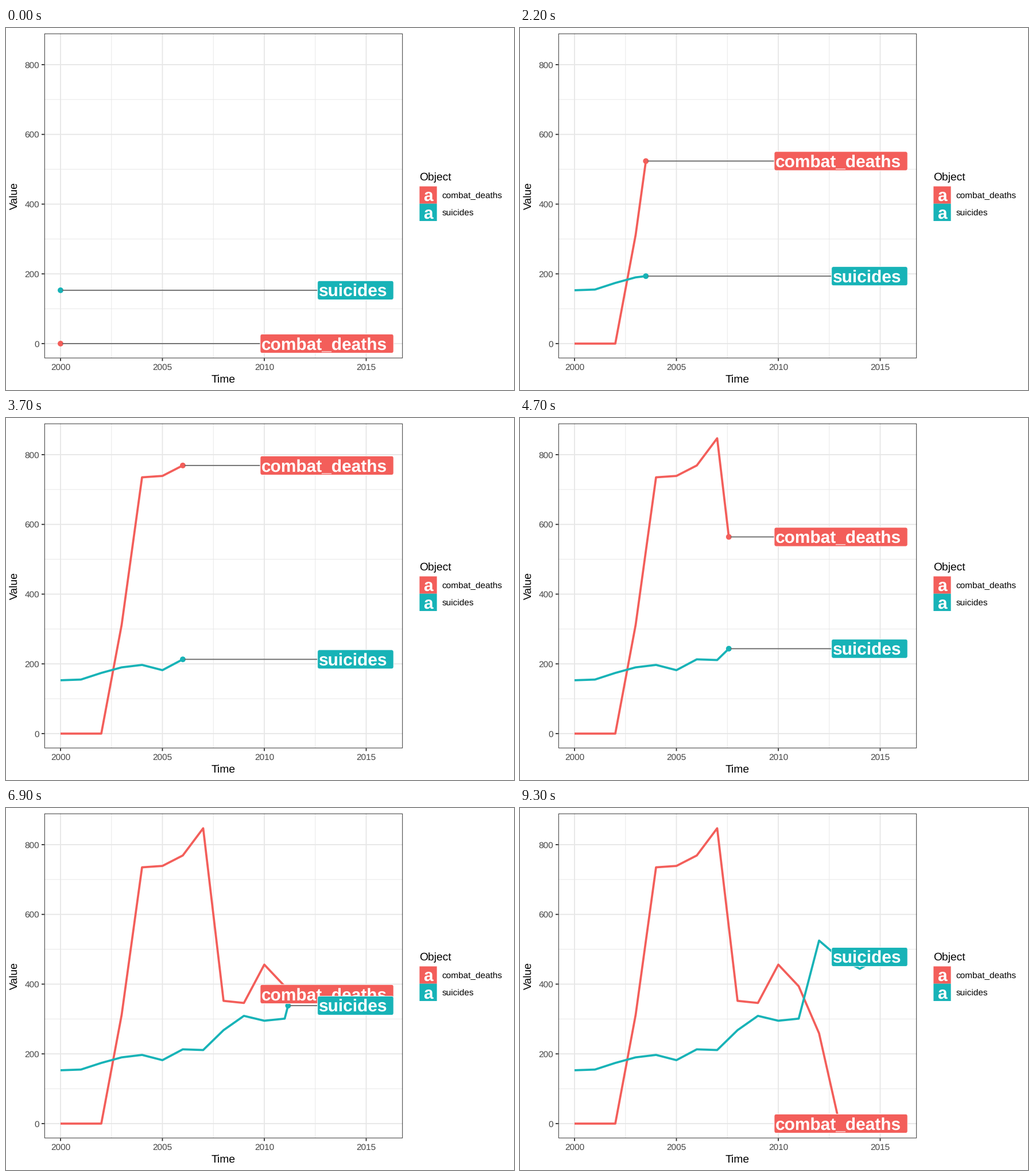
A matplotlib script that plays this animation: 885 px wide and 632 px high, repeating every 9900 ms.

```python
import numpy as np
import matplotlib.pyplot as plt
from matplotlib.animation import FuncAnimation
from matplotlib.patches import Circle, FancyBboxPatch, Rectangle

W, H, DPI = 885, 632, 100
PT = 72 / DPI  # points per pixel
FRAMES, INTERVAL = 99, 100

RED, TEAL = "#F35E5A", "#17B3B7"
GRID, DARK, TICK_TEXT, LEADER = "#E7E7E7", "#333333", "#444444", "#6B6B6B"
LEFT, RIGHT, TOP, BOTTOM = 66.8, 691.2, 9.6, 576.6
LABEL_RIGHT, LABEL_HALF = 675.2, 16.6
SMALL, MEDIUM, LARGE = 15.4, 19.25, 29.87

YEARS = np.arange(17)
KEY_FRAMES = np.round(YEARS * FRAMES / 16)
DEATHS = [0, 0, 0, 312, 735, 739, 769, 847, 352, 346, 456, 394, 259, 0, 0, 0, 0]
SUICIDES = [153, 155, 174, 190, 197, 182, 213, 211, 268, 309, 295, 301, 525,
            475, 444, 478, 478]

plt.rcParams["font.family"] = "Liberation Sans"
plt.rcParams["text.hinting"] = "none"


def px(year):
    return 95 + 35.5 * np.asarray(year)


def py(value):
    return 551 - 0.60875 * np.asarray(value)


fig = plt.figure(figsize=(W / DPI, H / DPI), dpi=DPI, facecolor="white")
ax = fig.add_axes([0, 0, 1, 1])
ax.set_xlim(0, W)
ax.set_ylim(H, 0)
ax.axis("off")


def line(xs, ys, color, width, z):
    return ax.plot(xs, ys, color=color, lw=width * PT, zorder=z, snap=False,
                   solid_capstyle="butt", solid_joinstyle="round")[0]


def text(x, y, s, size, color="black", **kw):
    kw.setdefault("va", "baseline")
    return ax.text(x, y, s, fontsize=size * PT, color=color, **kw)


def draw_panel():
    for year in (2.5, 7.5, 12.5):
        line([px(year)] * 2, [TOP, BOTTOM], GRID, 0.95, 0)
    for value in (100, 300, 500, 700):
        line([LEFT, RIGHT], [py(value)] * 2, GRID, 0.95, 0)
    for year in (0, 5, 10, 15):
        x = px(year)
        line([x, x], [TOP, BOTTOM], GRID, 1.87, 1)
        line([x, x], [BOTTOM, BOTTOM + 4.8], DARK, 1.87, 1)
        text(x, 596.5, str(2000 + year), SMALL, TICK_TEXT, ha="center")
    for value in range(0, 801, 200):
        y = py(value)
        line([LEFT, RIGHT], [y, y], GRID, 1.87, 1)
        line([LEFT - 4.8, LEFT], [y, y], DARK, 1.87, 1)
        text(58.3, y + 5.5, str(value), SMALL, TICK_TEXT, ha="right")
    ax.add_patch(Rectangle((LEFT + 0.5, TOP + 0.5), RIGHT - LEFT - 1,
                           BOTTOM - TOP - 1, fill=False, ec=DARK,
                           lw=PT, zorder=20, snap=False))
    text(379, 619, "Time", MEDIUM, ha="center")
    text(23.5, 293.3, "Value", MEDIUM, rotation=90, ha="right", va="center",
         rotation_mode="default")


def draw_legend():
    text(720, 265.7, "Object", MEDIUM)
    size = 30.24
    for i, (name, color) in enumerate((("combat_deaths", RED),
                                       ("suicides", TEAL))):
        y = 276.5 + i * size
        ax.add_patch(Rectangle((720.4, y), size, size, fc=color, lw=0,
                               snap=False))
        text(735.5, y + 25.6, "a", LARGE, "white", weight="bold", ha="center")
        text(759.8, y + 21, name, SMALL)


class Series:
    def __init__(self, name, values, color, left, z):
        self.values = values
        self.path = line([], [], color, 3.73, 3 + z)
        self.dot = ax.add_patch(Circle((0, 0), 4.95, fc=color, lw=0,
                                       zorder=5 + z))
        self.leader = line([], [], LEADER, 1.87, 7 + z)
        self.left = left
        self.box = ax.add_patch(FancyBboxPatch(
            (left, 0), LABEL_RIGHT - left, 2 * LABEL_HALF,
            boxstyle="round,pad=0,rounding_size=3.6", fc=color, ec="white",
            lw=0.95 * PT, zorder=9 + z, snap=False))
        self.label = text(left + 2.3, 0, name, LARGE, "white", weight="bold",
                          zorder=9.2 + z)

    def update(self, now):
        past = YEARS[YEARS < now]
        value = np.interp(now, YEARS, self.values)
        times = np.append(past, now)
        values = np.append(self.values[:len(past)], value)
        self.path.set_data(px(times), py(values))
        x, y = float(px(now)), float(py(value))
        self.dot.center = x, y
        self.leader.set_data([x + 3, max(x + 3, px(16))], [y, y])
        self.box.set_y(y - LABEL_HALF)
        self.label.set_y(y + 11)
        return [self.path, self.dot, self.leader, self.box, self.label]


draw_panel()
draw_legend()
series = [Series("combat_deaths", DEATHS, RED, 442.9, 0),
          Series("suicides", SUICIDES, TEAL, 542.7, 0.5)]


def update(frame):
    now = np.interp(frame, KEY_FRAMES, YEARS)
    return [artist for s in series for artist in s.update(now)]


anim = FuncAnimation(fig, update, frames=FRAMES, interval=INTERVAL,
                     init_func=lambda: update(0), repeat=True,
                     repeat_delay=0, blit=False)
plt.show()
```
